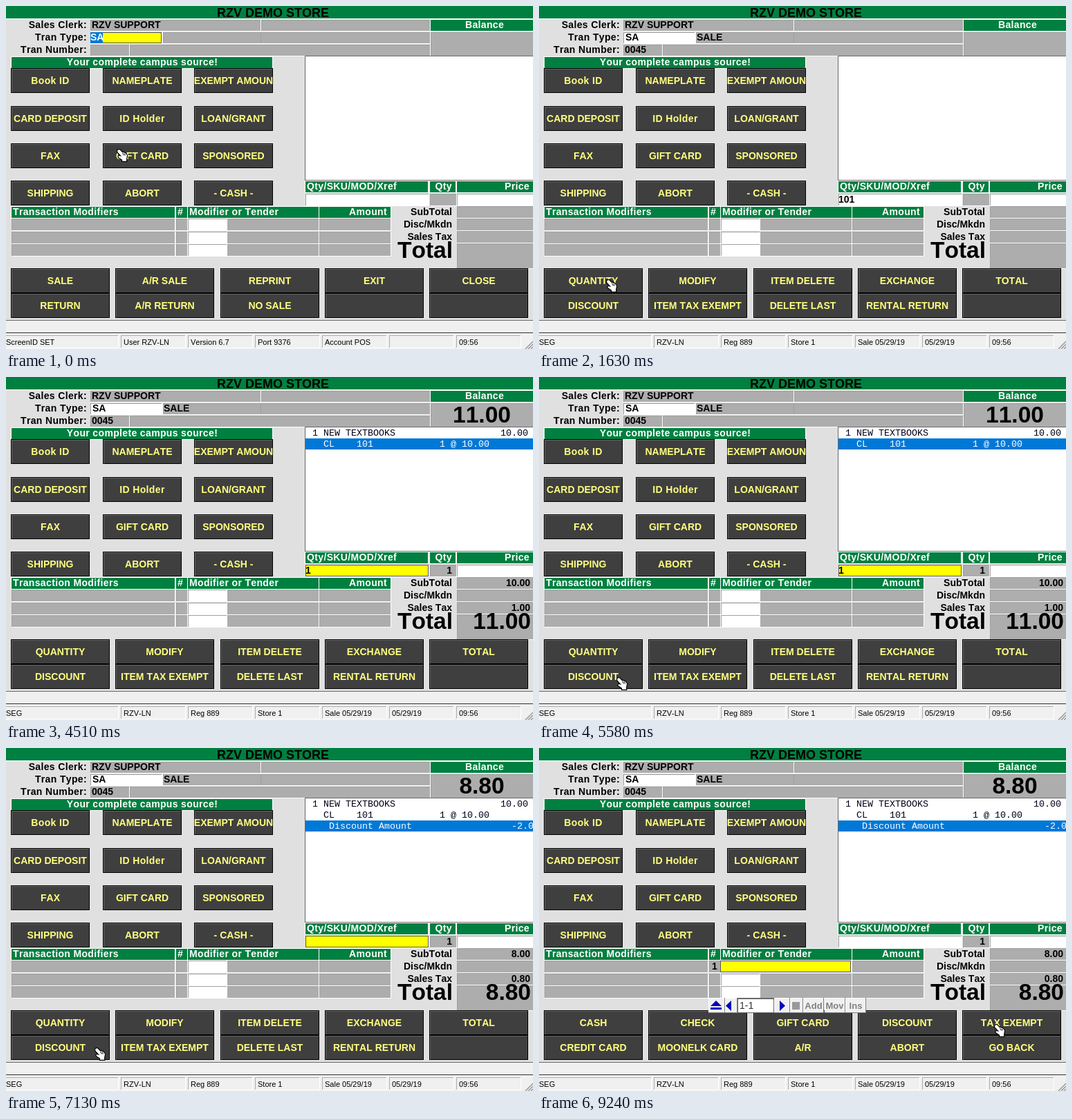
Write an HTML page that moves like this. It is 762 by 497 pixels and loops after 9.31 s.

```html
<!DOCTYPE html>
<html lang="en">
<head>
<meta charset="utf-8">
<title>Register demo</title>
<style>
html, body { margin: 0; width: 100%; height: 100%; overflow: hidden; background: #e0e0e0; }
svg { display: block; width: 762px; height: 497px; }
text { font: bold 14px "Liberation Sans", Arial, sans-serif; font-kerning: none; white-space: pre; }
.wide { letter-spacing: .35px; }
.title { font-size: 18px; }
.big { font-size: 33.5px; }
.nav { font-size: 13px; }
.status { font-weight: normal; font-size: 11px; }
.mono { font: 13.333px "Liberation Mono", "Courier New", monospace; }
.thin { font-weight: normal; }
</style>
</head>
<body>
<svg viewBox="0 0 762 497"><g id="screen"></g><g id="hand">
  <path d="M.7 3Q.5.7 3 .7H4.500L8.500 4.700Q10 4 11 5.200Q13 5 13.700 7Q15.500 7.500 15.500 10L14.700 14.500V18.300H7.500V16L2.500 12.800Q1 10 3.500 9.500L5.500 10L.8 5Z" fill="#fff" stroke="#000" stroke-width="1.200"/>
  <path d="M8.500 6l2 3.500M11 6.500l1.500 3" stroke="#000" fill="none"/>
</g></svg>
<script>
const LOOP = 9310, FRAME = 77.5, BLINK = 530;
const GREEN = '#008040', GREY = '#adadad', WHITE = '#fff', YELLOW = '#ff0', BLUE = '#0078d7', FACE = '#f0f0f0';

// moments at which the register changes state
const READY = 600, SALE = 760, QTY = 1710, ITEM = 3190, DISCOUNT = 6120, TENDER = 8290;

// each turn: a field takes focus, text is typed, Enter or a button ends it
const TURNS = [
  { field: 'sku', focus: READY, type: 1250, gap: 115, text: '101', end: 1630 },
  { field: 'price', focus: 1790, type: 2340, gap: 195, text: '10.', end: 2960 },
  { field: 'sku', focus: 3270, type: 3960, gap: 0, text: '1', end: 6040, back: 4660 },
  { field: 'sku', focus: 6200, text: '', end: 8220 },
  { field: 'tender', focus: 8370, text: '', end: LOOP }
];
const SPOT = { sku: [433, 272], price: [652, 272], tender: [263, 308] };

// pointer moves: from one time to another, ending at x, y
const MOVES = [
  { from: 0, to: 450, at: [97, 396] },
  { from: 4500, to: 4650, at: [88, 398] },
  { from: 4660, to: 5280, at: [98, 445] },
  { from: 5430, to: 5580, at: [112, 435] },
  { from: 7050, to: 7130, at: [128, 434] },
  { from: 7130, to: 7670, at: [661, 402] },
  { from: 9150, to: 9220, at: [658, 400] }
];

const GOODS = ['Book ID', 'NAMEPLATE', 'EXEMPT AMOUN', 'CARD DEPOSIT', 'ID Holder', 'LOAN/GRANT',
  'FAX', 'GIFT CARD', 'SPONSORED', 'SHIPPING', 'ABORT', '- CASH -'];
const KEYS = {
  start: ['SALE', 'A/R SALE', 'REPRINT', 'EXIT', 'CLOSE', 'RETURN', 'A/R RETURN', 'NO SALE', '', ''],
  sale: ['QUANTITY', 'MODIFY', 'ITEM DELETE', 'EXCHANGE', 'TOTAL',
    'DISCOUNT', 'ITEM TAX EXEMPT', 'DELETE LAST', 'RENTAL RETURN', ''],
  tender: ['CASH', 'CHECK', 'GIFT CARD', 'DISCOUNT', 'TAX EXEMPT',
    'CREDIT CARD', 'MOONELK CARD', 'A/R', 'ABORT', 'GO BACK']
};
const STATUS = {
  boot: ['ScreenID SET', 'User RZV-LN', 'Version 6.7', 'Port 9376', 'Account POS', '', '09:56'],
  open: ['SEG', 'RZV-LN', 'Reg 889', 'Store 1', 'Sale 05/29/19', '05/29/19', '09:56']
};

const box = (x, y, x2, y2, fill) =>
  `<rect x="${x}" y="${y}" width="${x2 - x}" height="${y2 - y}" fill="${fill}"/>`;
const label = (x, y, s, fill = '#000', anchor = 'start', cls = '') =>
  `<text x="${x}" y="${y}" fill="${fill}" text-anchor="${anchor}" class="${cls}">${s}</text>`;
const shape = (d, fill) => `<path d="${d}" fill="${fill}"/>`;

function field(x, y, x2, y2, fill = GREY) {
  const lit = fill === YELLOW;
  return box(x, y, x2 + 1, y2 + 1, WHITE) + box(x, y, x2, y2, lit ? '#555' : '#a0a0a0') +
    box(x + 1, y + 1, x2 - lit, y2 - lit, fill);
}

function head(x, x2, y, name = '', anchor = 'start') {
  const tx = { start: x + 2, middle: (x + x2) / 2 + 4, end: x2 - 5 }[anchor];
  return box(x - 1, y - 1, x2 + 1, y + 17, WHITE) + box(x, y, x2, y + 16, GREEN) +
    label(tx, y + 12, name, WHITE, anchor, 'wide');
}

function button(x, y, w, s) {
  return box(x, y, x + w, y + 36, '#000') + box(x + 1, y + 1, x + w - 1, y + 35, '#696969') +
    box(x + 2, y + 2, x + w - 1, y + 35, '#3f3f3f') +
    label(x + w / 2, y + 23, s, '#ffff80', 'middle', /[a-z]/.test(s) ? 'wide' : '');
}

// state derived from time
const active = t => TURNS.find(n => t >= n.focus && t < n.end);
const typed = (n, t) => [...n.text].filter((_, i) => t >= n.type + i * n.gap).join('');
const tint = (name, t) => active(t)?.field === name ? YELLOW : WHITE;
const textWidth = s => [...s].reduce((w, c) => w + (c === '.' ? 3.9 : 7.8), 0);

function sums(t) {
  if (t < ITEM) return null;
  const net = t < DISCOUNT ? 10 : 8;
  return [net, net * .1, net * 1.1].map(v => v.toFixed(2));
}

function header(t, sum) {
  const boot = t < READY, sale = t >= SALE;
  let s = box(0, 0, 762, 18, GREEN) + box(0, 18, 762, 19, WHITE) +
    label(386, 16, 'RZV DEMO STORE', '#000', 'middle', 'title');
  [['Sales Clerk:', 368], ['Tran Type:', 226], ['Tran Number:', 178]].forEach(([name, split], i) => {
    const y = 20 + 18 * i;
    s += label(117, y + 12, name, '#000', 'end', 'wide') +
      field(122, y, split, y + 16) + field(split + 1, y, 613, y + 16);
  });
  s += field(122, 38, 225, 54, boot ? YELLOW : WHITE) + field(368, 38, 613, 54);
  if (boot || sale) s += label(124, 32, 'RZV SUPPORT');
  if (boot) s += box(122, 38, 140, 54, BLUE) + label(122, 50, 'SA', WHITE);
  if (sale) s += label(125, 50, 'SA') + label(228, 50, 'SALE') + label(124, 68, '0045');
  s += head(614, 762, 20, 'Balance', 'middle') + field(614, 38, 762, 72);
  return sum ? s + label(688, 66, sum[2], '#000', 'middle', 'big') : s;
}

function receipt(t) {
  let s = box(432, 72, 762, 253, '#696969') + box(433, 73, 762, 252, WHITE);
  const rows = ['1 NEW TEXTBOOKS'.padEnd(34) + '10.00', '  CL    101'.padEnd(23) + '1 @ 10.00'];
  if (t < ITEM) rows.length = 0;
  if (t >= DISCOUNT) rows.push('   Discount Amount'.padEnd(36) + '-2.00');
  rows.forEach((row, i) => {
    const y = 73 + 16 * i, picked = i === rows.length - 1;
    if (picked) s += box(433, y, 762, y + 16, BLUE);
    s += label(443, y + 12, row, picked ? WHITE : '#000018', 'start', 'mono');
  });
  return s;
}

function entry(t) {
  const last = TURNS.findLast(n => n.field === 'sku' && t >= n.focus), now = active(t);
  return head(433, 610, 254, 'Qty/SKU/MOD/Xref') + head(613, 650, 254, 'Qty', 'end') +
    head(652, 762, 254, 'Price', 'end') +
    field(433, 272, 611, 289, tint('sku', t)) + field(613, 272, 651, 289) +
    field(652, 272, 762, 289, tint('price', t)) +
    label(433, 285, last ? typed(last, t) : '') +
    label(651, 285, now?.field === 'price' ? typed(now, t) : '') +
    label(645, 285, t >= QTY ? '1' : '', '#000', 'end');
}

function tenders(t) {
  const cols = [[8, 244, 'Transaction Modifiers'], [246, 262, '#'], [263, 452, 'Modifier or Tender'], [453, 556, 'Amount']];
  let s = cols.map(([a, b, name], i) => head(a, b, 291, name, i === 3 ? 'end' : 'start')).join('');
  for (let i = 0; i < 3; i++) {
    const y = 308 + Math.ceil(18.3 * i);
    s += cols.map(([a, b]) => field(a, y, b, y + 17)).join('') + field(263, y, 319, y + 17, WHITE);
  }
  if (tint('tender', t) === YELLOW) s += label(250, 321, '1') + field(262, 308, 451, 325, YELLOW);
  return s;
}

function totals(sum) {
  let s = '';
  ['SubTotal', 'Disc/Mkdn', 'Sales Tax', ''].forEach((name, i) => {
    const y = 290 + 18 * i;
    s += field(652, y, 762, name ? y + 17 : 380) + label(645, y + 13, name, '#000', 'end');
  });
  s += label(646, 365, 'Total', '#000', 'end', 'big');
  if (sum) s += label(758, 303, sum[0], '#000', 'end') + label(758, 339, sum[1], '#000', 'end') +
    label(759, 365, sum[2], '#000', 'end', 'big');
  return s;
}

function navBar() {
  const tab = (x, x2) => box(x, 362, x2, 384, '#808080') + box(x, 362, x2 - 1, 383, WHITE) +
    box(x + 1, 363, x2 - 1, 383, FACE);
  let s = tab(245, 269) + tab(269, 287) + tab(340, 363) + tab(363, 382) +
    box(287, 362, 340, 384, '#696969') + box(288, 364, 339, 383, WHITE) +
    label(290, 378, '1-1', '#333', 'start', 'thin') +
    shape('M256 366l8 8h-16zM248 376h16v3h-16zM278 366v15l-8-7.500zM348 366v15l8-7.500z', '#0000c0') +
    box(366, 368, 377, 379, '#999');
  ['Add', 'Mov', 'Ins'].forEach((name, i) => {
    const x = 382 + 30.5 * i;
    s += tab(Math.round(x), Math.round(x + 30)) + label(x + 15, 378, name, '#808080', 'middle', 'nav');
  });
  return s;
}

function statusBar(t) {
  let s = box(0, 455, 762, 456, '#696969') + box(0, 456, 762, 473, FACE) +
    box(0, 473, 762, 474, '#303030') + box(0, 474, 762, 497, FACE);
  STATUS[t < READY ? 'boot' : 'open'].forEach((txt, i) => {
    const x = i ? 69 + 97 * i : -1, x2 = 163 + 97 * i;
    s += box(x, 477, x2, 496, WHITE) + box(x, 477, x2 - 1, 495, GREY) + box(x + 1, 478, x2 - 1, 495, FACE) +
      label(i ? x + 4 : 0, 491, txt, '#000', 'start', 'status');
  });
  return s + '<path d="M751 497l11-11M755 497l7-7M759 497l3-3" stroke="#999" stroke-width="1.500"/>';
}

function caret(t) {
  const n = active(t);
  if (!n) return '';
  const text = typed(n, t);
  const since = text ? n.type + (text.length - 1) * n.gap : n.focus;
  if (Math.floor((t - since) / BLINK) % 2) return '';
  const [x0, y] = SPOT[n.field], x = Math.floor(x0 + textWidth(text));
  return box(x, y, x + 1, y + 16, '#000');
}

function draw(t) {
  const sum = sums(t);
  let s = box(0, 0, 762, 497, '#e0e0e0') + header(t, sum) + head(8, 385, 74) +
    label(197, 86, 'Your complete campus source!', WHITE, 'middle', 'wide');
  GOODS.forEach((name, i) =>
    s += button(Math.floor(7.5 + 132.5 * (i % 3)), Math.floor(90.8 + 54.2 * Math.floor(i / 3)), 114, name));
  s += receipt(t) + entry(t) + tenders(t) + totals(sum);
  KEYS[t < SALE ? 'start' : t < TENDER ? 'sale' : 'tender'].forEach((name, i) =>
    s += button(Math.round(7 + 151.25 * (i % 5)), i < 5 ? 380 : 416, 143, name));
  if (tint('tender', t) === YELLOW) s += navBar();
  return s + statusBar(t) + caret(t);
}

function pointer(t) {
  let pos = [160, 207];
  for (const m of MOVES) {
    const k = Math.min(1, Math.max(0, (t - m.from) / (m.to - m.from))), e = k * k * (3 - 2 * k);
    pos = pos.map((v, i) => v + (m.at[i] - v) * e);
  }
  return pos.map(Math.round);
}

// the pointer hides while keys are pressed
const hidden = t => TURNS.some(n => t >= n.type && t < (n.back ?? n.end));

const layer = document.getElementById('screen'), hand = document.getElementById('hand');
const began = performance.now();
let shown = '';

function tick() {
  const t = Math.max(0, performance.now() - began) % LOOP;
  const next = draw(t);
  if (next !== shown) layer.innerHTML = shown = next;
  hand.setAttribute('transform', `translate(${pointer(Math.floor(t / FRAME + .1) * FRAME)})`);
  hand.setAttribute('visibility', hidden(t) ? 'hidden' : 'visible');
  requestAnimationFrame(tick);
}
tick();
</script>
</body>
</html>
```
